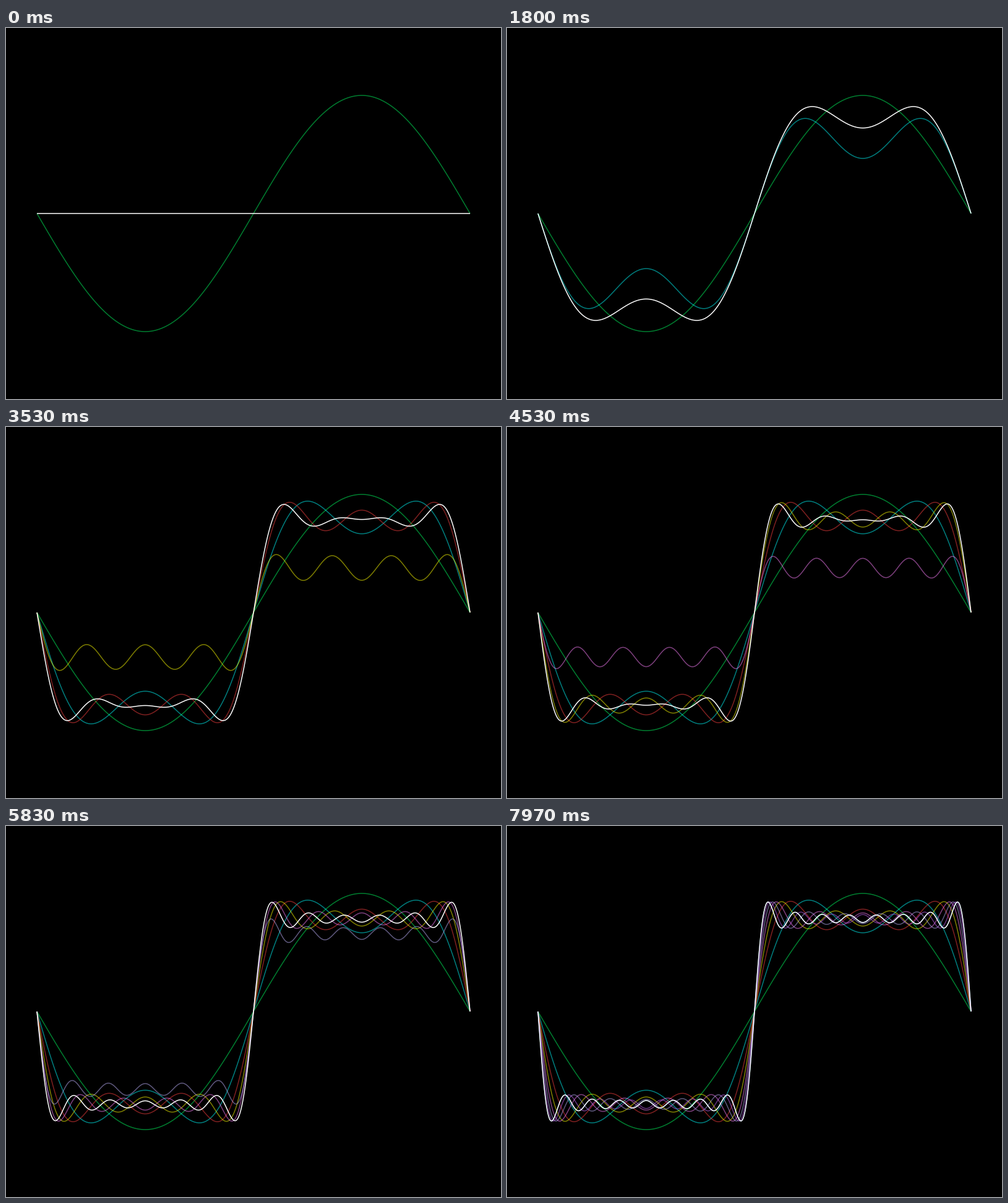
These frames come from a looping animation (800 by 600 pixels, 8 s). A matplotlib script:

```python
import numpy as np
import matplotlib.pyplot as plt
from matplotlib.animation import FuncAnimation

W, H, DPI = 800, 600, 100
LOOP, TICK = 8000, 20     # milliseconds
STEPS_PER_SECOND = 30     # the curves move in steps of 1/30 s
HOLD = 4                  # steps before a new harmonic starts to rise
LEVEL = 150               # height of the square wave in pixels

# one colour per harmonic, one harmonic per second
PALETTE = "#00ff61 #00ffff #ff4040 #ffff00 #ff80ff #bfb3ff #cc66ff #59b3ff".split()

t = np.linspace(-np.pi, np.pi, 1001)
x = W / 2 + 350 * t / np.pi


def harmonic(i):
    n = 2 * i + 1
    return LEVEL * 4 / np.pi * np.sin(n * t) / n


def partial_sum(count):
    return sum((harmonic(i) for i in range(count)), np.zeros_like(t))


plt.rcParams["path.simplify"] = False
fig = plt.figure(figsize=(W / DPI, H / DPI), dpi=DPI, facecolor="black")
ax = fig.add_axes([0, 0, 1, 1])
ax.set_xlim(0, W)
ax.set_ylim(H, 0)
ax.axis("off")


def make_line(color, alpha=1.0):
    line, = ax.plot([], [], color=color, alpha=alpha, lw=1.5 * 72 / DPI,
                    solid_capstyle="butt", solid_joinstyle="round")
    line.set_snap(False)
    return line


def show(line, height):
    line.set_data(x, H / 2 - height)


parts = [make_line(c, 0.5) for c in PALETTE]
total = make_line("white")


def update(frame):
    step = round(frame * TICK * STEPS_PER_SECOND / 1000)
    term, k = divmod(step, STEPS_PER_SECOND)
    last = STEPS_PER_SECOND - 1
    mix = k / last
    lift = max(0, k - HOLD) / (last - HOLD)
    base, wave = partial_sum(term), harmonic(term)

    for i, line in enumerate(parts):
        line.set_visible(i <= term)
        if i < term:
            show(line, partial_sum(i + 1))
    show(parts[term], wave + lift * base)
    show(total, base + mix * wave)
    return parts + [total]


def reset():
    return update(0)


anim = FuncAnimation(fig, update, frames=LOOP // TICK, init_func=reset,
                     interval=TICK, repeat=True, repeat_delay=0, blit=False)
plt.show()
```
